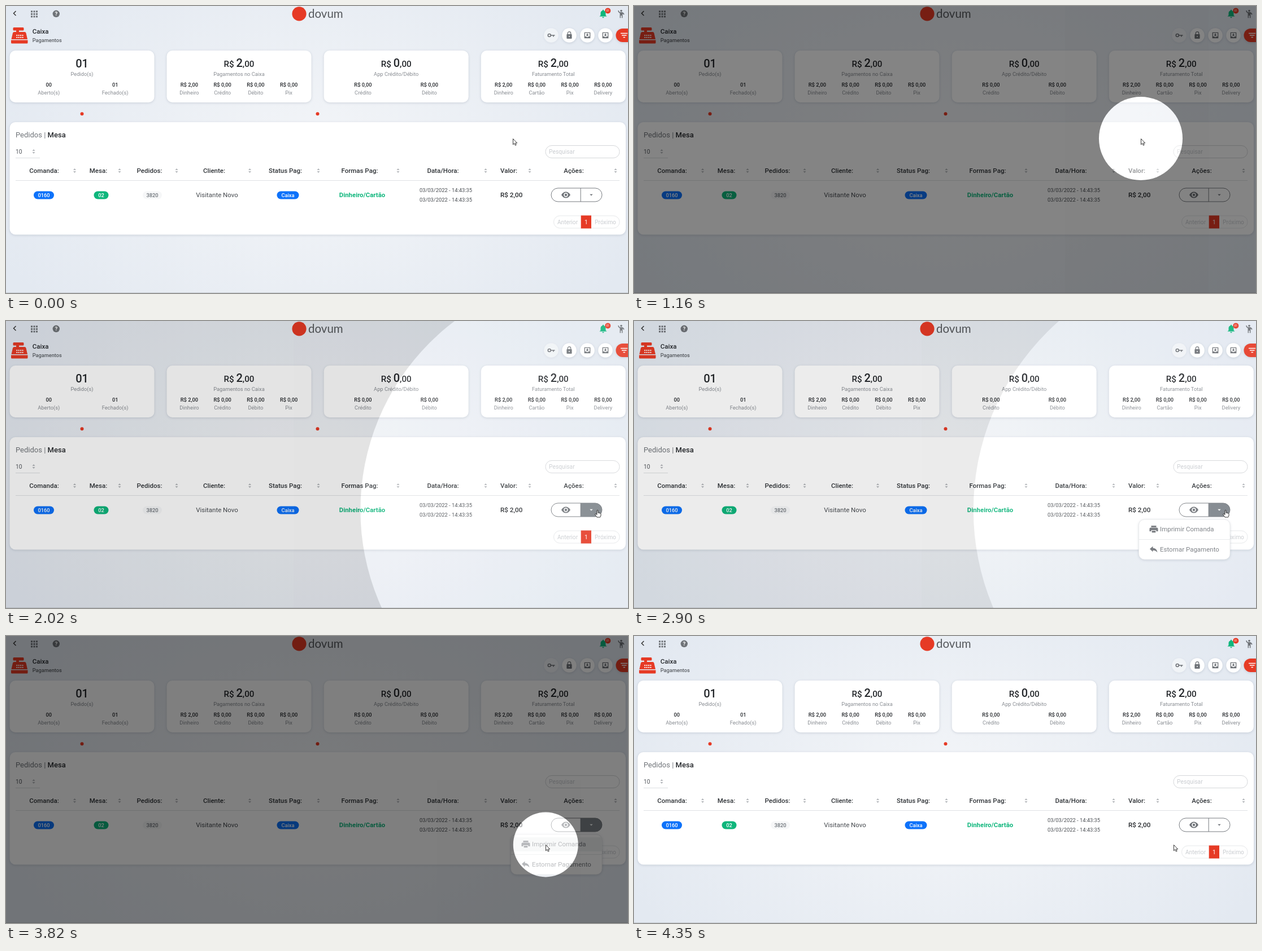
An HTML page for the animation above (4.42 s loop, 1101 by 509 pixels).

```html
<!DOCTYPE html>
<html lang="pt-BR">
<head>
<meta charset="utf-8">
<title>Caixa</title>
<style>
html, body { margin: 0; width: 100%; height: 100%; overflow: hidden; }
body { background: radial-gradient(ellipse 620px 420px at 50% 52%, #f3f5f8, #e3e9f1); }
svg { display: block; position: absolute; left: 0; top: 0; }
text { font-family: Roboto, sans-serif; white-space: pre; }
.lift { filter: drop-shadow(0 1px 2px rgba(70, 85, 110, .2)); }
</style>
</head>
<body>
<svg id="stage" width="1101" height="509" viewBox="0 0 1101 509"></svg>
<script>
const RED = '#e63a25', GREEN = '#0fb67c', BLUE = '#0d72fa';
const INK = '#24272b', GREY = '#888c92', ICON = '#6f7378', PALE = '#c9ccd0';

// Drawing helpers
const text = (x, y, str, size, fill = INK, weight = 400, anchor = 'middle', extra = '') =>
  `<text x="${x}" y="${y}" font-size="${size}" fill="${fill}" font-weight="${weight}" text-anchor="${anchor}" ${extra}>${str}</text>`;
const rect = (x, y, w, h, r, fill, extra = '') =>
  `<rect x="${x}" y="${y}" width="${w}" height="${h}" rx="${r}" fill="${fill}" ${extra}/>`;
const circle = (x, y, r, fill, extra = '') =>
  `<circle cx="${x}" cy="${y}" r="${r}" fill="${fill}" ${extra}/>`;
const path = (d, fill, extra = '') => `<path d="${d}" fill="${fill}" ${extra}/>`;
const line = (d, color, width = 1) => path(d, 'none', `stroke="${color}" stroke-width="${width}"`);
const at = (x, y, body) => `<g transform="translate(${x} ${y})">${body}</g>`;
const sorter = (x, y) => at(x, y, path('M-2.5-1L0-4L2.5-1ZM-2.5 1L0 4L2.5 1Z', '#b3b6ba'));
const badge = (x, w, label, fill, color = '#fff') =>
  rect(x - w / 2, 328.5, w, 14, 7, fill) + text(x, 338.8, label, 9.3, color, 500);

function topBar() {
  let grid = '';
  for (let i = 0; i < 9; i++) grid += rect(44 + i % 3 * 4.5, 8.3 + Math.floor(i / 3) * 4.5, 3, 3, 0, ICON);
  return line('M17.5 9L13.5 13L17.5 17', '#333', 1.5) + grid +
    circle(88.8, 13.8, 6.2, ICON) + text(88.8, 17.2, '?', 9.5, '#fff', 700) +
    circle(519, 13.8, 12.6, RED) +
    text(535, 20.5, 'dovum', 20.5, '#55585c', 400, 'start', 'style="font-family:Lato,sans-serif"') +
    at(1057, 14, path('M-6.5 4.5L-4.5 2.5V-1.5Q-4.5-5-1-6V-7Q0-8 1-7V-6Q4.5-5 4.5-1.5V2.5L6.5 4.5ZM-1.8 5.5H1.8Q1.4 7.2 0 7.2T-1.8 5.5Z', GREEN)) +
    circle(1065.3, 8.4, 5, RED) + text(1065.3, 10.4, '01', 5.2, '#fff') +
    at(1089, 14, circle(0, -5.4, 1.8, ICON) +
      path('M-5.7-6H-4.2Q-4-3-1.6-2.9H2Q4-2.5 5.6.4L4.5 1.4L2.4-.5V7.3H.9V3H-.9V7.3H-2.4V-1.3Q-5.6-2.4-5.7-6Z', ICON));
}

function titleBar() {
  let keys = '';
  for (let i = 0; i < 8; i++) keys += rect(18.3 + i % 4 * 3.4, 51 + Math.floor(i / 4) * 3.8, 2, 2, .5, '#fff');
  const register = path('M14 38H30Q31.5 38 31.5 39.5V42Q31.5 43.5 30 43.5H23V46H33Q35 46 35.5 48L38 59H9.5L12 48Q12.5 46 14.5 46H18V43.5H14Q12.5 43.5 12.5 42V39.5Q12.5 38 14 38ZM9 60.5H38.5V65Q38.5 66.5 37 66.5H10.5Q9 66.5 9 65Z', RED);
  const inbox = x => at(x, 52, line('M-4.7-4.7H4.7V4.7H-4.7Z', ICON, 1.3) +
    path('M-5 2H-2Q0 4.5 2 2H5V5H-5ZM-.9-3H.9V-1H2.7L0 1.7L-2.7-1H-.9Z', ICON));
  const round = (x, o) => circle(x, 52, 12.8, '#fff', `opacity="${o}" class="lift"`);
  return register + keys +
    text(46.8, 49, 'Caixa', 11.5, INK, 500, 'start') +
    text(46.8, 63.8, 'Pagamentos', 9.2, '#595d62', 500, 'start') +
    round(965, .45) + round(997, 1) + round(1029, 1) + round(1061, 1) +
    circle(961.8, 52, 2.5, 'none', `stroke="${ICON}" stroke-width="1.6"`) +
    line('M964.5 52H971.5M969 52V54.5', ICON, 1.7) +
    rect(992.4, 50, 9.2, 8, 1, ICON) + line('M994.3 50V48.3A2.7 2.7 0 0 1 999.7 48.3V50', ICON, 1.3) +
    circle(997, 54, 1, '#fff') + inbox(1029) + inbox(1061) +
    rect(1079.5, 40, 40, 24, 12, RED, 'class="lift"') +
    line('M1088 48.5H1100M1090 52H1098.5M1092.5 55.5H1096', '#fff', 1.5);
}

function card(x, amount, label, columns) {
  const mid = x + 128;
  const span = (s, size) => `<tspan font-size="${size}">${s}</tspan>`;
  const total = amount.length > 1
    ? span('R$ ', 15.2) + span(amount[0], 20) + span(amount[1], 15.2)
    : span(amount[0], 20);
  const gap = columns.length > 2 ? 58.7 : 117.4;
  return rect(x, 79, 256, 92, 10, '#fff', 'class="lift"') +
    text(mid, amount.length > 1 ? 107.5 : 109, total, 20, INK, 500) + text(mid, 124.2, label, 9.3, GREY) +
    columns.map(([value, name], i) => {
      const cx = mid + (i - (columns.length - 1) / 2) * gap;
      return text(cx, 143.3, value, 9.3, INK, 500) + text(cx, 156.6, name, 9.3, GREY);
    }).join('');
}

function cards() {
  const paid = 'R$ 2,00', none = 'R$ 0,00';
  return card(6.5, ['01'], 'Pedido(s)', [['00', 'Aberto(s)'], ['01', 'Fechado(s)']]) +
    card(284.5, ['2', ',00'], 'Pagamentos no Caixa', [[paid, 'Dinheiro'], [none, 'Crédito'], [none, 'Débito'], [none, 'Pix']]) +
    card(562.7, ['0', ',00'], 'App Crédito/Débito', [[none, 'Crédito'], [none, 'Débito']]) +
    card(840.8, ['2', ',00'], 'Faturamento Total', [[paid, 'Dinheiro'], [none, 'Cartão'], [none, 'Pix'], [none, 'Delivery']]) +
    circle(134.5, 191.2, 3, RED) + circle(551.5, 191.2, 3, RED);
}

function table() {
  const headers = [['Comanda:', 67.5, 121.5], ['Mesa:', 163.5, 201], ['Pedidos:', 254, 302], ['Cliente:', 368.5, 431.5],
    ['Status Pag:', 494.5, 553], ['Formas Pag:', 626, 694], ['Data/Hora:', 773.5, 849], ['Valor:', 890, 927], ['Ações:', 1005, 1079]];
  const stamp = '03/03/2022 - 14:43:35';
  return rect(6.5, 206, 1090.5, 199.5, 10, '#fff', 'class="lift"') +
    text(17, 233, `Pedidos | <tspan fill="${INK}" font-weight="500">Mesa</tspan>`, 13, '#707479', 400, 'start') +
    text(17, 261.7, '10', 10.3, '#55595e', 400, 'start') + sorter(49, 258) + line('M17 269.5H60', '#dcdee1') +
    rect(955, 247.5, 131, 22, 11, '#fff', 'stroke="#d5d7da"') +
    text(961, 262.2, 'Pesquisar', 10.3, PALE, 400, 'start') +
    headers.map(([name, x, s]) => text(x, 296, name, 11.5, '#2f3337', 500) + sorter(s, 292)).join('') +
    line('M17 309.5H1086', '#dfe1e4') +
    badge(67, 36, '0160', BLUE) + badge(168.5, 26, '02', GREEN) + badge(259, 34, '3820', '#f6f7f8', '#6c7278') +
    badge(499, 39, 'Caixa', BLUE) +
    text(373.5, 339, 'Visitante Novo', 11.5, '#45494e') +
    text(630.5, 339, 'Dinheiro/Cartão', 11.4, GREEN, 700) +
    text(778.5, 330, stamp, 9.35, '#4a4e53') + text(778.5, 346.6, stamp, 9.35, '#4a4e53') +
    text(894.7, 339, 'R$ 2,00', 11.7, INK, 500) +
    path('M1017 323H1043A12 12 0 0 1 1043 347H1017Z', '#7d848a', 'id="hover"') +
    rect(965, 323, 90, 24, 12, 'none', 'stroke="#777b80"') + line('M1017.2 323V347', '#777b80') +
    at(991, 335, path('M-8 0Q-4.8-5.5 0-5.5T8 0Q4.8 5.5 0 5.5T-8 0Z', ICON) + circle(0, 0, 3.7, '#fff') + circle(0, 0, 2.2, ICON)) +
    path('M1033.3 333.7H1038.7L1036 336.5Z', ICON, 'id="caret"') +
    rect(969.5, 372, 116.5, 22, 11, '#fff', 'stroke="#e6e8ea"') + rect(1017.7, 371.5, 18.3, 23, 0, RED) +
    text(994, 386.5, 'Anterior', 10.2, PALE) + text(1026.8, 386.5, '1', 10.3, '#fff') + text(1061, 386.5, 'Próximo', 10.2, PALE);
}

function menu() {
  return '<g id="menu">' + rect(893.5, 352, 161.5, 71, 10, '#fff', 'class="lift" stroke="#e2e4e7" stroke-width=".7"') +
    rect(894, 357, 160.5, 25, 0, '#f2f3f4', 'id="row"') + line('M894 387.5H1055', '#e8eaec') +
    at(920, 369, path('M-4.5-6H4.5V-3.3H-4.5ZM-5.5-2.5H5.5Q7.5-2.5 7.5-.5V4H4.5V2H-4.5V4H-7.5V-.5Q-7.5-2.5-5.5-2.5ZM-3.3 3H3.3V6.3H-3.3Z', ICON)) +
    at(920, 405.5, path('M-7-1.2L-1.5-6V-3Q5.5-2.5 6.5 5Q3.5 1-1.5 1.2V4Z', ICON)) +
    text(931, 373, 'Imprimir Comanda', 11.5, '#777b80', 400, 'start') +
    text(931, 409, 'Estornar Pagamento', 11.5, '#777b80', 400, 'start') + '</g>';
}

const stage = document.getElementById('stage');
stage.innerHTML = topBar() + titleBar() + cards() + table() + menu() +
  line('M0 508.5H1101', '#c6cbd2') +
  `<g id="shade">${rect(0, 0, 1101, 509, 0, '#000')}${circle(0, 0, 1, '#fff', 'id="spot"')}</g>` +
  path('M.5.5V10.8L2.9 8.6L4.4 12.2L6.2 11.4L4.6 8H7.7Z', '#fff', 'id="arrow" stroke="#222" stroke-width=".9"') +
  path('M-1 1Q0-.5 1 1V5L5 6Q6 6.3 6 7.5V10L4.7 13H-1L-4.2 8.5Q-4.5 7-3 7L-1 8.5Z', '#fff', 'id="hand" stroke="#222" stroke-width=".9"');

const part = Object.fromEntries(['hover', 'caret', 'menu', 'row', 'shade', 'spot', 'arrow', 'hand']
  .map(id => [id, document.getElementById(id)]));
const show = (el, on) => el.setAttribute('visibility', on ? 'visible' : 'hidden');

// The screen refreshes in uneven steps, with rests between bursts.
const LOOP = 4420;
const steps = (from, to, n) => Array.from({ length: n }, (_, i) => Math.round(from + (to - from) * i / (n - 1)));
const ticks = [0, ...steps(830, 1160, 5), ...steps(1220, 1350, 3), ...steps(1400, 1880, 8), 1960, 2020,
  ...steps(2100, 2400, 5), 2900, ...steps(3000, 3390, 6), ...steps(3450, 3970, 8), ...steps(4050, 4350, 5)];

const clamp = v => Math.min(1, Math.max(0, v));
const mix = (a, b, k) => a + (b - a) * k;

// Cubic bezier (.41, .52, 0, .94), solved by bisection
function ease(x) {
  let lo = 0, hi = 1;
  for (let i = 0; i < 24; i++) {
    const u = (lo + hi) / 2;
    if (1.23 * u * (1 - u) ** 2 + u ** 3 < x) lo = u; else hi = u;
  }
  return 1.56 * lo * (1 - lo) ** 2 + 2.82 * lo * lo * (1 - lo) + lo ** 3;
}
const fade = (t, start, length) => ease(clamp((t - start) / length));

function pointer(t) {
  const a = clamp((t - 1310) / 540), b = clamp((t - 3330) / 460);
  const go = a * a * (3 - 2 * a), back = Math.sin(b * Math.PI / 2);
  return [897 + 150 * go - 92 * back, 235 + 100 * go + 35 * back];
}

function draw() {
  const now = performance.now() % LOOP;
  const t = ticks.filter(v => v <= now).pop();
  const [x, y] = pointer(t), [sx, sy] = pointer(t - 55);
  const focus = fade(t, 810, 500) - fade(t, 1870, 430) + fade(t, 2850, 500) - fade(t, 3838, 500);
  const open = t >= 2100 && t < 4050;
  const overButton = x > 965 && x < 1055 && y > 323 && y < 347;
  const active = open || (overButton && x > 1017);

  show(part.menu, open);
  show(part.row, open && x > 894 && x < 1055 && y > 352 && y < 387);
  show(part.hover, active);
  part.caret.setAttribute('fill', active ? '#fff' : ICON);
  show(part.arrow, !overButton);
  show(part.hand, overButton);
  for (const c of [part.arrow, part.hand]) c.setAttribute('transform', `translate(${x} ${y})`);
  part.shade.setAttribute('opacity', focus / 2);
  part.spot.setAttribute('cx', sx);
  part.spot.setAttribute('cy', sy);
  part.spot.setAttribute('r', mix(515.7, 57.5, focus));
  requestAnimationFrame(draw);
}
draw();
</script>
</body>
</html>
```
